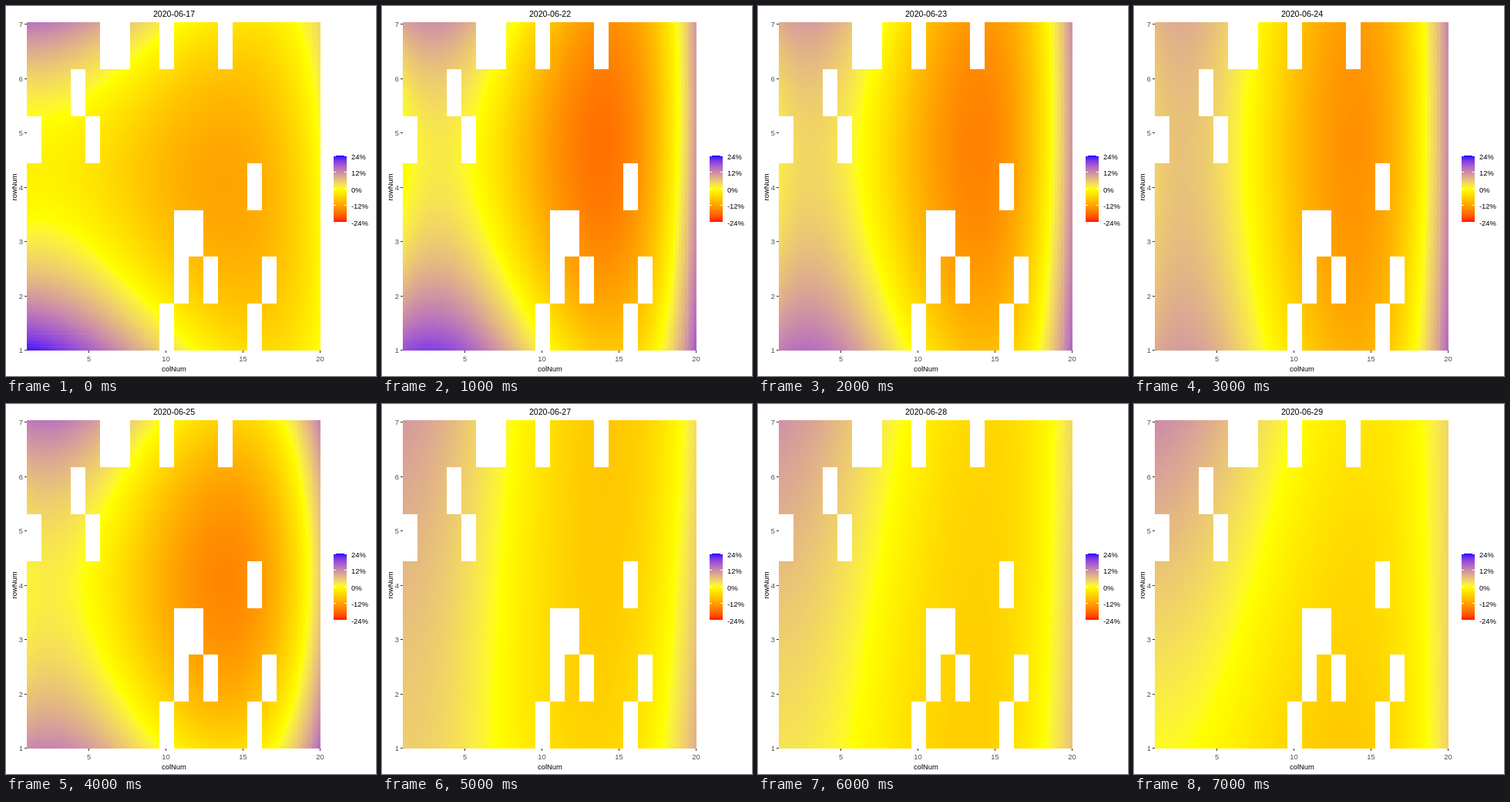
These frames come from a looping animation (480x480 px, 8 s). An HTML page with a canvas:

```html
<!DOCTYPE html>
<html lang="en">
<head>
<meta charset="utf-8">
<title>Heat map by day</title>
<style>
  html, body { margin: 0; width: 100%; height: 100%; overflow: hidden; background: #fff; }
  #stage { position: relative; width: 480px; height: 480px; overflow: hidden; }
  canvas, svg { position: absolute; }
  canvas { image-rendering: pixelated; }
  #heat { left: 27px; top: 21px; width: 381px; height: 426px; }
  #bar { left: 425px; top: 194px; width: 17px; height: 86px; }
  svg { left: 0; top: 0; }
  text { font: 9.4px "Liberation Sans", Arial, sans-serif; fill: #000; }
  .mid { text-anchor: middle; }
  .end { text-anchor: end; }
  .tick { fill: #4d4d4d; }
  #date { font-size: 10.6px; }
</style>
</head>
<body>
<div id="stage">
  <canvas id="heat" width="100" height="100"></canvas>
  <canvas id="bar" width="1" height="86"></canvas>
  <svg id="plot" width="480" height="480" viewBox="0 0 480 480">
    <text id="date" class="mid" x="218" y="14"></text>
    <text class="mid" x="218" y="474">colNum</text>
    <text class="mid" transform="translate(14 235) rotate(-90)">rowNum</text>
  </svg>
</div>
<script>
const $ = id => document.getElementById(id);
const STEP = 1000, N = 100, VALLEY = 13.8;
const mix = (a, b, t) => a + (b - a) * t;

// Along row 4 a cubic falls from `high` at column `peak` to `low` at VALLEY.
// Across rows it bends by `bow` and slopes by `lean`, each given at [left, right].
const days = [
  { day: 17, peak: 2, high: -1.6, low: -11.8, bow: [2.3, 0.3], lean: [-1.5, 0.7] },
  { day: 22, peak: 3.3, high: 2.5, low: -17, bow: [1.6, 0.3], lean: [-1.4, -1] },
  { day: 24, peak: 2.8, high: 6.3, low: -13.8, bow: [0.36, 0.2], lean: [-0.25, -0.5] },
  { day: 25, peak: 2.4, high: 1.9, low: -15.2, bow: [1.3, 1], lean: [0.3, -0.4] },
  { day: 27, peak: 0.8, high: 7, low: -7, bow: [0.08, 0.05], lean: [0.9, -0.8] },
  { day: 29, peak: 0.8, high: 5.5, low: -5.3, bow: [0.08, 0], lean: [1.9, 0] }
];

function percent(d, col, row) {
  const s = (col - d.peak) / (VALLEY - d.peak), t = (col - 1) / 19, y = row - 4;
  return mix(d.high, d.low, s * s * (3 - 2 * s)) + mix(...d.bow, t) * y * y + mix(...d.lean, t) * y;
}

// Halfway surface between two days.
function between(a, b, day) {
  const out = { day };
  for (const k of ["peak", "high", "low"]) out[k] = mix(a[k], b[k], 0.5);
  for (const k of ["bow", "lean"]) out[k] = a[k].map((v, i) => mix(v, b[k][i], 0.5));
  return out;
}
days.splice(5, 0, between(days[4], days[5], 28));
days.splice(2, 0, between(days[1], days[2], 23));

// Diverging scale, blended in CIE Lab.
const RED = [53.24, 80.09, 67.2], YELLOW = [97.14, -21.55, 94.48], BLUE = [32.3, 79.19, -107.86];

function labToRgb([L, a, b]) {
  const fy = (L + 16) / 116;
  const inv = f => f > 6 / 29 ? f ** 3 : (f - 4 / 29) * 108 / 841;
  const x = 0.9505 * inv(fy + a / 500), y = inv(fy), z = 1.089 * inv(fy - b / 200);
  return [
    3.2406 * x - 1.5372 * y - 0.4986 * z,
    -0.9689 * x + 1.8758 * y + 0.0415 * z,
    0.0557 * x - 0.204 * y + 1.057 * z
  ].map(c => 255 * (c <= 0.0031308 ? 12.92 * c : 1.055 * c ** (1 / 2.4) - 0.055));
}

function shade(v) {
  const t = Math.min(1, Math.abs(v) / 24), far = v < 0 ? RED : BLUE;
  return labToRgb(YELLOW.map((c, i) => mix(c, far[i], t)));
}

function paint(canvas, value) {
  const { width: w, height: h } = canvas;
  const ctx = canvas.getContext("2d"), img = ctx.createImageData(w, h);
  for (let y = 0; y < h; y++)
    for (let x = 0; x < w; x++)
      img.data.set([...shade(value((x + 0.5) / w, (y + 0.5) / h)), 255], (y * w + x) * 4);
  ctx.putImageData(img, 0, 0);
  return img;
}

function add(tag, attrs, label) {
  const el = document.createElementNS("http://www.w3.org/2000/svg", tag);
  for (const k in attrs) el.setAttribute(k, attrs[k]);
  if (label !== undefined) el.textContent = label;
  $("plot").append(el);
}
const box = (x, y, width, height, fill) => add("rect", { x, y, width, height, fill });

// Empty cells: columns of each row, top to bottom.
const holes = ["5 6 9 13", "3", "0 4", "15", "10 11", "10 12 16", "9 15"];
const edgeX = c => Math.round(27.2 + 19.05 * c);
const edgeY = r => r ? Math.round(21.75 + 60.7 * r) : 21;
holes.forEach((cols, r) => cols.split(" ").map(Number).forEach(c =>
  box(edgeX(c), edgeY(r), edgeX(c + 1) - edgeX(c), edgeY(r + 1) - edgeY(r), "#fff")));

for (let r = 1; r <= 7; r++) {
  const y = Math.round(516.5 - 70.45 * r);
  box(24, y, 3, 1, "#333");
  add("text", { x: 22, y: y + 4, class: "end tick" }, r);
}
for (let c = 5; c <= 20; c += 5) {
  const x = Math.round(7.5 + 19.97 * c);
  box(x, 447, 1, 3, "#333");
  add("text", { x: x + 0.5, y: 461, class: "mid tick" }, c);
}

paint($("bar"), (x, y) => 24 - 48 * y);
for (let i = 0; i < 5; i++) {
  const y = Math.round(194 + i * 21.4);
  box(425, y, 3, 1, "#fff");
  box(439, y, 3, 1, "#fff");
  add("text", { x: 448, y: y + 4.5 }, 24 - 12 * i + "%");
}

const images = days.map(d => paint($("heat"), (x, y) => percent(d, 1 + 19 * x, 7 - 6 * y)));
const heat = $("heat").getContext("2d");
const start = performance.now();
let shown = -1;

function show(now) {
  const i = Math.floor(Math.max(0, now - start) / STEP) % days.length;
  if (i !== shown) {
    shown = i;
    heat.putImageData(images[i], 0, 0);
    $("date").textContent = "2020-06-" + days[i].day;
  }
  requestAnimationFrame(show);
}
show(start);
</script>
</body>
</html>
```
